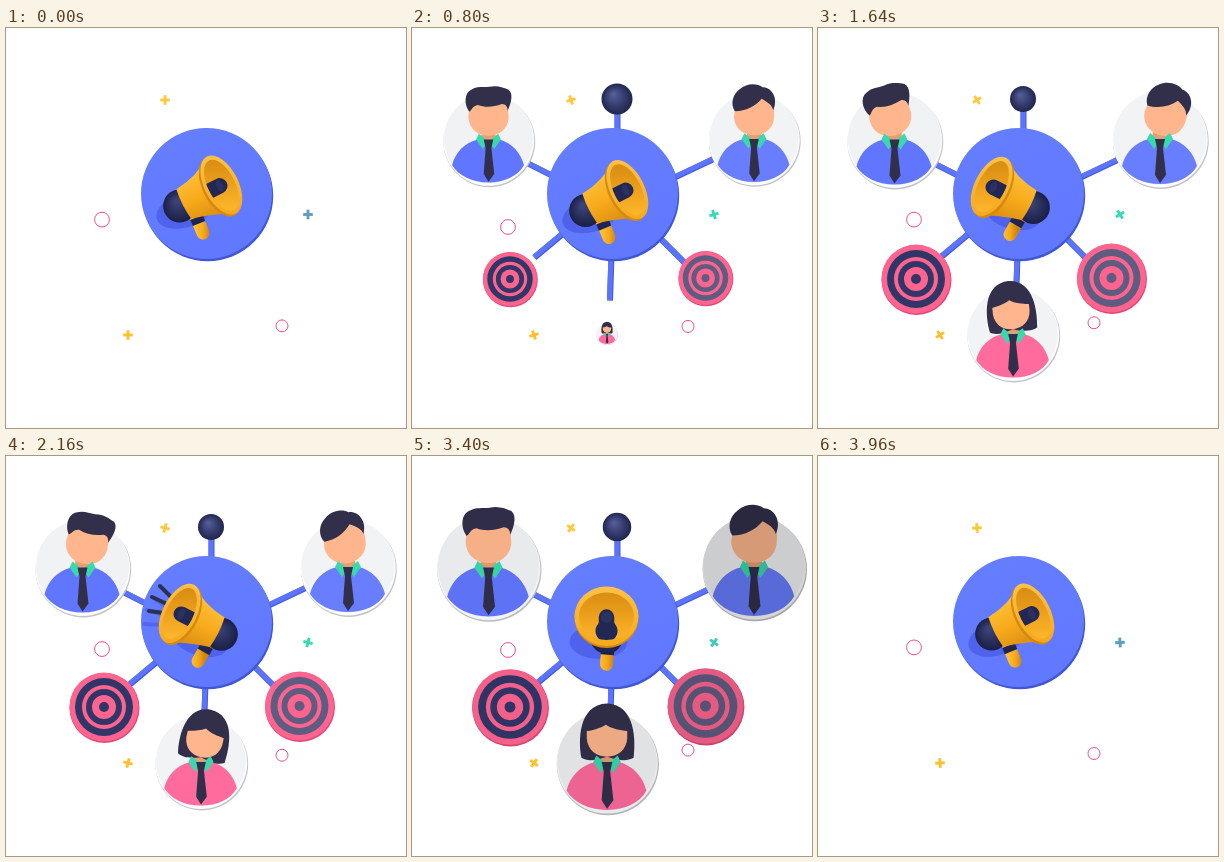
Write an HTML page with a canvas that moves like this. It is 400 px wide and 400 px high and loops after 4 s.

```html
<!DOCTYPE html>
<html lang="en">
<head>
<meta charset="utf-8">
<title>Megaphone network</title>
<style>
html, body { margin: 0; width: 100%; height: 100%; overflow: hidden; background: #fff; }
canvas { display: block; width: 400px; height: 400px; }
</style>
</head>
<body>
<canvas id="stage" width="400" height="400"></canvas>
<script>
const ctx = document.getElementById('stage').getContext('2d');
const LOOP = 4000, STEP = 40, TAU = Math.PI * 2;
const NAVY = '#322f4b', SKIN = '#ffb68c', TEAL = '#3bd8ae', PINK = '#ff6b9d', AMBER = '#f7aa1b';
const HUB = [201, 166];
let light = 1;

const clamp = x => Math.min(1, Math.max(0, x));
const progress = (t, start, length) => clamp((t - start) / length);
const smooth = p => p * p * (3 - 2 * p);
const easeOut = p => 1 - (1 - p) ** 3;
const backIn = p => p * p * (2.70158 * p - 1.70158);
const lerp = (a, b, p) => a + (b - a) * p;

// Eased value along [time, value] keys.
function track(t, keys) {
  if (t <= keys[0][0]) return keys[0][1];
  for (let i = 1; i < keys.length; i++) {
    const [t0, a] = keys[i - 1], [t1, b] = keys[i];
    if (t <= t1) return lerp(a, b, smooth((t - t0) / (t1 - t0)));
  }
  return keys[keys.length - 1][1];
}

const rgb = hex => [1, 3, 5].map(i => parseInt(hex.slice(i, i + 2), 16));
const mix = (a, b, p) => `rgb(${rgb(a).map((v, i) => Math.round(lerp(v, rgb(b)[i], p)))})`;
const lit = color => light < 1 ? mix('#000000', color, light) : color;

function fill(path, color) {
  ctx.fillStyle = lit(color);
  ctx.fill(new Path2D(path));
}

function ellipse(x, y, rx, ry, color, turn = 0) {
  ctx.beginPath();
  ctx.ellipse(x, y, Math.max(0, rx), Math.max(0, ry), turn, 0, TAU);
  ctx.fillStyle = typeof color === 'string' ? lit(color) : color;
  ctx.fill();
}

const circle = (x, y, r, color) => ellipse(x, y, r, r, color);

function line(x0, y0, x1, y1, width, color, cap = 'butt') {
  ctx.beginPath();
  ctx.moveTo(x0, y0);
  ctx.lineTo(x1, y1);
  ctx.lineWidth = width;
  ctx.lineCap = cap;
  ctx.strokeStyle = color;
  ctx.stroke();
}

function gradient(x0, y0, x1, y1, ...colors) {
  const g = ctx.createLinearGradient(x0, y0, x1, y1);
  colors.forEach((c, i) => g.addColorStop(i / (colors.length - 1), c));
  return g;
}

function at(x, y, scale, draw) {
  if (scale <= 0.01) return;
  ctx.save();
  ctx.translate(x, y);
  ctx.scale(scale, scale);
  draw();
  ctx.restore();
}

const popScale = (t, enter, exit) =>
  easeOut(progress(t, enter, 360)) * (1 - backIn(progress(t, exit, 480)));

// Heads stand on the local origin and turn around it.
const heads = {
  quiff() {
    fill('M-20 -32 C-20 -44 20 -44 20 -32 L21 -18 C20 -4 9 1 0 1 C-10 1 -20 -5 -21 -18Z', SKIN);
    fill('M-20 -24 C-26 -32 -25 -44 -18 -47 C-11 -51 -6 -49 1 -50 C9 -52 16 -49 21 -47 C26 -43 24 -34 20 -25 C20 -29 18 -32 14 -32 C5 -29 -3 -28 -11 -31 C-17 -30 -17 -26 -20 -24Z', NAVY);
  },
  swept() {
    fill('M-19 -32 C-19 -44 21 -44 21 -32 L21 -18 C20 -4 9 1 0 1 C-10 1 -20 -5 -21 -18Z', SKIN);
    fill('M-20 -24 C-25 -32 -22 -42 -15 -47 C-7 -54 4 -53 9 -49 C18 -49 26 -38 20 -25 C19 -31 13 -34 8 -37 C1 -29 -8 -24 -20 -24Z', NAVY);
  },
  bob() {
    fill('M-24 1 C-27 -15 -27 -49 0 -50 C27 -49 27 -15 25 1 C18 5 9 3 0 0 C-9 3 -18 5 -24 1Z', NAVY);
    fill('M-19 -24 C-11 -25 -4 -28 -1 -30 C5 -26 12 -25 19 -24 L19 -17 C18 -6 10 0 0 0 C-10 0 -18 -6 -19 -17Z', SKIN);
  }
};

function avatar(x, y, scale, radius, suit, head, tilt, face) {
  at(x, y, scale, () => {
    circle(.8, 2, radius + .4, '#c2c3ca');
    circle(.2, .9, radius, '#fdfdfe');
    circle(0, -.8, radius - 1, face);
    const k = radius / 47.5;
    ctx.scale(k, k);
    fill('M-11 0 C-25 3 -35 14 -38 27 C-31 38 -17 45 0 45 C17 45 31 38 37 27 C34 14 24 3 11 0 L0 7Z', suit);
    fill('M-7 -8 L7 -8 L8 4 L-8 4Z', '#ec9c70');
    ctx.save();
    ctx.translate(0, -5);
    ctx.rotate(tilt * Math.PI / 180);
    heads[head]();
    ctx.restore();
    fill('M-10 -6 L0 2 L-6 10 L-13 0Z M10 -6 L0 2 L6 10 L13 0Z', TEAL);
    fill('M-5 0 L5 0 L3 9 L6 36 L0 44 L-5 36 L-3 9Z', NAVY);
  });
}

function target(x, y, scale, dark) {
  at(x, y, scale, () => {
    circle(.5, 1, 35, '#df4778');
    [[34.5, '#ff648f'], [29, dark], [22, '#ff648f'], [18, dark], [12, '#ff648f'], [5, dark]]
      .forEach(([r, color]) => circle(0, 0, r, color));
  });
}

function ball(t) {
  const enter = track(t, [[620, 0], [780, 1.2], [960, 1]]);
  at(205, 71, enter * (1 - backIn(progress(t, 3180, 480))), () => {
    const g = ctx.createRadialGradient(-3, -4, 1, 0, 0, 13);
    g.addColorStop(0, '#525c97');
    g.addColorStop(.6, '#333a6b');
    g.addColorStop(1, '#20264c');
    circle(0, 0, 13, g);
  });
}

function spokes(t) {
  const reach = smooth(progress(t, 320, 360)) * (1 - smooth(progress(t, 3540, 260)));
  if (!reach) return;
  const spans = [
    [205, 166, 205, 78], [201, 178, 84, 119], [201, 178, 336, 114],
    [201, 163, 122, 229], [201, 163, 272, 234], [201, 166, 197.5, 272]
  ];
  for (const [x, y, endX, endY] of spans) {
    const ex = lerp(x, endX, reach), ey = lerp(y, endY, reach);
    line(x + .5, y + .6, ex + .5, ey + .6, 6, '#4358dc');
    line(x, y, ex, ey, 5, '#5c74fa');
  }
}

function hub() {
  circle(HUB[0] + .7, HUB[1] + 1.8, 65.5, '#4056d4');
  circle(HUB[0] - .5, HUB[1] - .5, 65.5, gradient(170, 100, 230, 232, '#657eff', '#5f78ff'));
}

function megaphone(t) {
  const bob = 2.5 * (1 - Math.cos(TAU * t / 2000));
  const yaw = .96 * (1 - 2 * smooth(progress(t, 960, 560)) + 2 * smooth(progress(t, 3100, 600)));
  const ax = 51 * Math.sin(yaw), ay = -21, depth = Math.cos(yaw) * 51 / 55;
  const side = ax / 42, len = Math.hypot(ax, ay), angle = Math.atan2(ay, ax);
  const R = 32, x = 194.5, y = 167.5 + bob;
  const bx = x + ax / 2, by = y + ay / 2, rx = x - ax / 2, ry = y - ay / 2;

  ellipse(x - 8 - side * 8, y + 15, 29, 17, 'rgba(48,58,205,.38)', -side * .3);

  // Grip
  const hx = 196 - 7 * side, hy = 186 + bob, gx = 194.5 + 2.5 * side, gy = 205 + bob;
  line(hx, hy, gx, gy, 13, gradient(gx - 7, 0, gx + 7, 0, '#ffbe37', AMBER, '#cf8210'), 'round');
  line(lerp(hx, gx, .18), lerp(hy, gy, .18), lerp(hx, gx, .5), lerp(hy, gy, .5), 13.5, '#1f2450');

  const cap = ctx.createRadialGradient(rx - 3, ry - 5, 2, rx, ry, 17);
  cap.addColorStop(0, '#3a4277');
  cap.addColorStop(1, '#191e43');
  circle(rx, ry, 16.5, cap);

  // The horn is drawn along its axis, mouth at the right end.
  ctx.save();
  ctx.translate(rx, ry);
  ctx.rotate(angle);
  const flip = Math.cos(angle) < 0 ? -1 : 1;
  ctx.scale(1, flip);
  const back = len * .1, waist = len * .62;
  ctx.beginPath();
  ctx.moveTo(back, -16.5);
  ctx.quadraticCurveTo(waist, -18.5, len, -R);
  ctx.lineTo(len, R);
  ctx.quadraticCurveTo(waist, 23, back, 16.5);
  ctx.quadraticCurveTo(back - 5 * depth, 0, back, -16.5);
  ctx.fillStyle = gradient(0, -26, 0, 28, '#ffc03a', AMBER, '#d98c12');
  ctx.fill();
  ctx.restore();

  const minor = R * depth;
  ellipse(bx - ax * .04, by + 2, minor, R, '#d58910', angle);
  ellipse(bx, by, minor, R, gradient(bx, by - R, bx, by + R, '#ffc247', '#f5a81b'), angle);
  const inner = gradient(bx, by - 28, bx, by + 28, '#d58a12', '#eda01c', '#ffb92f');
  ellipse(bx, by, minor * .8, R * .86, inner, angle);

  // Core, hidden where the rim covers it.
  ctx.save();
  ctx.beginPath();
  ctx.ellipse(bx, by, minor * .8, R * .86, angle, 0, TAU);
  ctx.clip();
  const tx = bx - ax * .04, ty = by - ay * .04;
  line(bx - ax * .7, by - ay * .7, tx, ty, 15.5, '#222853', 'round');
  if (Math.abs(side) < .6) circle(bx - ax * .7, by - ay * .7, 11 - 5 * Math.abs(side), '#222853');
  ellipse(tx, ty, 6 * depth, 6, '#2b3260', angle);
  ctx.restore();
}

function soundWaves(t) {
  const p = track(t, [[1840, 0], [2040, 1], [2440, 1], [2640, 0]]);
  if (p < .02) return;
  [[166, 142, 154, 130], [159, 147, 146, 141], [158, 157, 143, 155]].forEach(([x0, y0, x1, y1]) => {
    line(x0, y0 + 12, lerp(x0, x1 - 5, p), lerp(y0, y1, p) + 13, 4, 'rgba(64,82,225,.5)', 'round');
    line(x0, y0, lerp(x0, x1, p), lerp(y0, y1, p), 4 * p, '#2b3057', 'round');
  });
}

function ornaments(t) {
  const spin = TAU * t / LOOP;
  const cool = 1 - progress(t, 100, 500) + progress(t, 3200, 760);
  const pluses = [[159, 72, '#ffc83f'], [302, 186.5, mix('#35dcb0', '#5f9fbb', clamp(cool))], [122, 307, '#ffc02e']];
  for (const [x, y, color] of pluses) {
    ctx.save();
    ctx.translate(x, y);
    ctx.rotate(spin);
    line(-4.8, 0, 4.8, 0, 2.9, color);
    line(0, -4.8, 0, 4.8, 2.9, color);
    ctx.restore();
  }
  const float = (base, reach, peak) => base + reach * Math.cos(TAU * (t - peak) / 2000);
  for (const [x, y, r] of [[96, float(195, 4, 820), 7.4], [276, float(297.2, 3.1, 430), 6]]) {
    ctx.beginPath();
    ctx.arc(x, y, r, 0, TAU);
    ctx.lineWidth = 1;
    ctx.strokeStyle = '#f04f80';
    ctx.stroke();
  }
}

function people(t) {
  const dusk = progress(t, 3140, 300);
  const sway = track(t, [[1200, 0], [1640, -1], [2190, 1], [2720, 0]]);
  const lean = (left, right) => sway * (sway < 0 ? left : right);
  const upper = popScale(t, 565, 3160), middle = popScale(t, 656, 3180), lower = popScale(t, 770, 3200);

  light = 1 - .05 * dusk;
  target(98, 251, middle, '#313669');
  light = 1 - .12 * dusk;
  target(293.5, 250, middle, '#5f5c82');

  light = 1 - .04 * dusk;
  avatar(76.5, 111.5, upper, 47.5, '#6176ff', 'quiff', lean(13, 14), '#f1f2f4');
  light = 1 - .18 * dusk;
  avatar(342, 111, upper, 47.5, '#687eff', 'swept', lean(-16, -10), '#f2f3f5');
  light = 1 - .08 * dusk;
  avatar(195, 306, lower, 46, PINK, 'bob', lean(6, 12), '#f2f3f5');
  light = 1;
}

function draw(now) {
  const t = Math.floor(now % LOOP / STEP) * STEP;
  ctx.clearRect(0, 0, 400, 400);
  spokes(t);
  hub();
  ball(t);
  ornaments(t);
  people(t);
  soundWaves(t);
  megaphone(t);
}

const start = performance.now();
function frame() {
  draw(performance.now() - start);
  requestAnimationFrame(frame);
}
frame();
</script>
</body>
</html>
```
